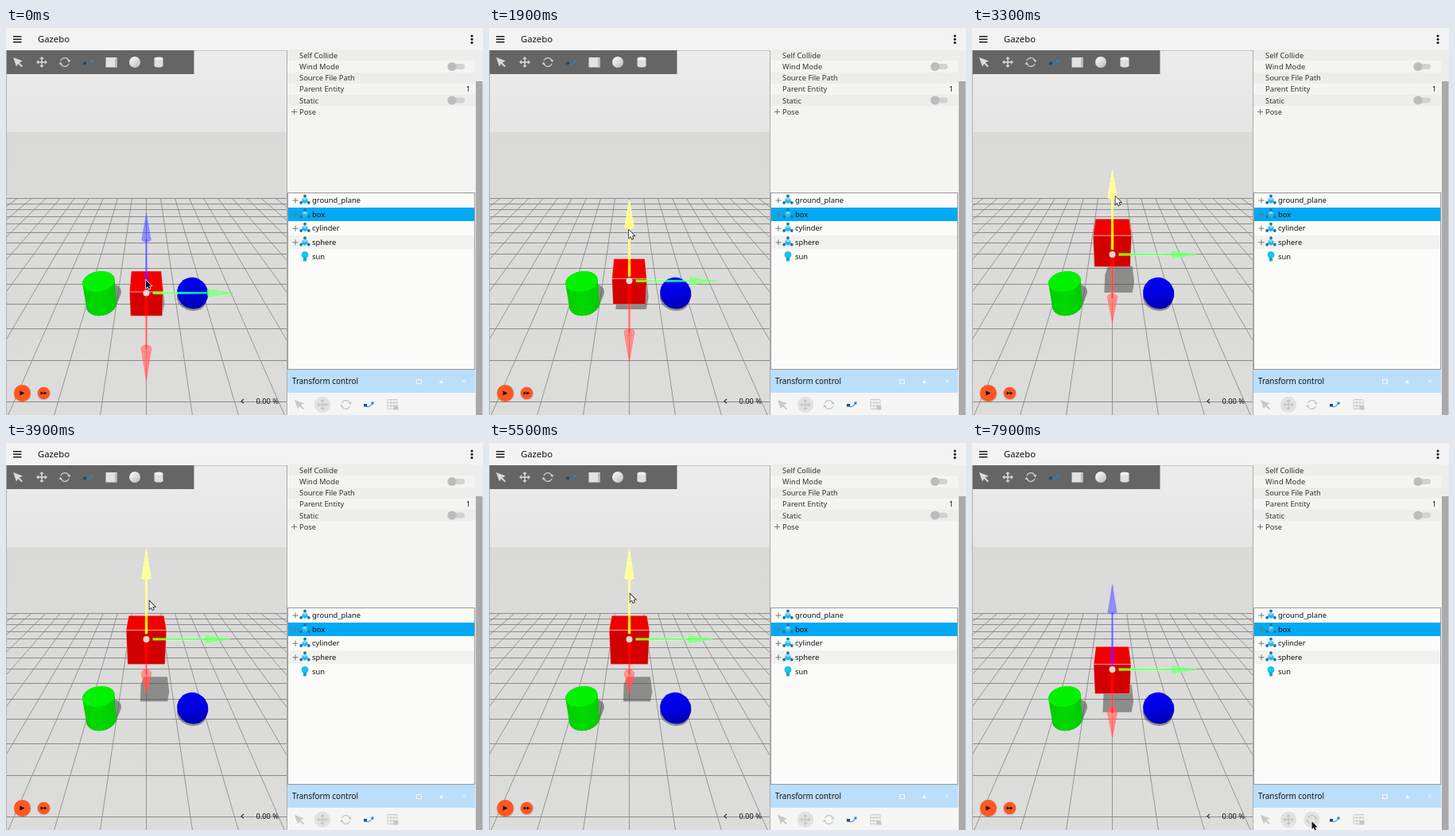
These frames come from a looping animation (600x487 px, 8000 ms). An HTML page with a canvas:

```html
<!DOCTYPE html>
<html lang="en">
<head>
<meta charset="utf-8">
<title>Transform control</title>
<style>
html, body { margin: 0; width: 100%; height: 100%; overflow: hidden; }
canvas { display: block; width: 600px; height: 487px; }
</style>
</head>
<body>
<canvas id="stage" width="600" height="487"></canvas>
<script>
const g = document.getElementById('stage').getContext('2d');
const LOOP = 8000, STEP = 100, TAU = Math.PI * 2;
const FONT = '"Noto Sans", "Open Sans", sans-serif';
const X = [1, 0, 0], Y = [0, 1, 0], Z = [0, 0, 1];

// Camera at (-6, 0, 6), pitched down by half a radian
const CX = 176.5, CY = 258, FOCAL = 305.7;
const COS = Math.cos(0.5), SIN = Math.sin(0.5);

function project([x, y, z]) {
  const dx = x + 6, dz = z - 6, depth = dx * COS - dz * SIN;
  return [CX - FOCAL * y / depth, CY - FOCAL * (dx * SIN + dz * COS) / depth];
}

// Motion
const ramp = (t, from, to) => Math.min(1, Math.max(0, (t - from) / (to - from)));
const easeOut = k => 1 - (1 - k) ** 3;
const easeIn = k => k ** 4;

const boxHeight = t => 0.5 + 0.5 * ramp(t, 1200, 1500) + ramp(t, 1900, 2600)
  + easeOut(ramp(t, 3200, 3800)) - easeIn(ramp(t, 5700, 6500));

// The handles keep a constant size on screen
const handleSize = h => 0.347 * Math.hypot(6, 6 - h);

// The pointer hangs below the arrow tip, then leaves for the panel
function pointerAt(t) {
  const h = boxHeight(t), tip = project([0, 0, h + handleSize(h)])[1];
  const grip = 84 - 16 * ramp(t, 0, 300) - 8 * ramp(t, 400, 800) - 22 * ramp(t, 1000, 1100)
    + 28 * ramp(t, 2700, 3900) - 9 * ramp(t, 4200, 5000);
  const swing = Math.sin(Math.PI * ramp(t, 4100, 5000)), leave = ramp(t, 6800, 7800);
  const x = 176 + 4.5 * ramp(t, 3100, 3300) - 3 * ramp(t, 4200, 5000) + 9 * swing;
  return [x + 250 * leave ** 1.3, tip + grip + 25 * swing + 241 * leave ** 0.55];
}

// Drawing helpers
function hull(points) {
  const p = [...points].sort((a, b) => a[0] - b[0] || a[1] - b[1]);
  const half = list => {
    const out = [];
    for (const q of list) {
      while (out.length > 1) {
        const [a, b] = out.slice(-2);
        if ((b[0] - a[0]) * (q[1] - a[1]) - (b[1] - a[1]) * (q[0] - a[0]) > 0) break;
        out.pop();
      }
      out.push(q);
    }
    return out.slice(0, -1);
  };
  return [...half(p), ...half(p.reverse())];
}

function path(points, close = true) {
  g.beginPath();
  points.forEach(([x, y]) => g.lineTo(x, y));
  if (close) g.closePath();
}
function poly(points, color) { path(points); g.fillStyle = color; g.fill(); }
function stroke(points, color, width = 1, close = false) {
  path(points, close);
  g.strokeStyle = color;
  g.lineWidth = width;
  g.stroke();
}
function rect(x, y, w, h, color) { g.fillStyle = color; g.fillRect(x, y, w, h); }
function frame(x, y, w, h, color) {
  g.strokeStyle = color;
  g.lineWidth = 1;
  g.strokeRect(x + 0.5, y + 0.5, w - 1, h - 1);
}
function disc(x, y, r, color, ry = r) {
  g.beginPath();
  g.ellipse(x, y, r, ry, 0, 0, TAU);
  g.fillStyle = color;
  g.fill();
}
function text(str, x, y, size = 9.35, color = '#111', align = 'left') {
  g.font = size + 'px ' + FONT;
  g.textAlign = align;
  g.fillStyle = color;
  g.fillText(str, x, y);
}
function gradient(x0, y0, x1, y1, ...colors) {
  const grad = g.createLinearGradient(x0, y0, x1, y1);
  colors.forEach((c, i) => grad.addColorStop(i / (colors.length - 1), c));
  return grad;
}
function at(x, y, draw) {
  g.save();
  g.translate(x, y);
  draw();
  g.restore();
}
function ring(c, u, v, r, n = 24) {
  return Array.from({ length: n }, (_, i) => {
    const a = i / n * TAU, p = Math.cos(a) * r, q = Math.sin(a) * r;
    return c.map((m, k) => m + u[k] * p + v[k] * q);
  });
}

// Scene
function ground() {
  const line = '#838383';
  rect(0, 28, 354, 103, gradient(0, 28, 0, 131, '#ececec', '#e5e5e5'));
  rect(0, 131, 354, 356, gradient(0, 131, 0, 487, '#dadad9', '#dcdcdb'));
  for (let i = -10; i <= 10; i++) {
    stroke([project([-4.4, i, 0]), project([10, i, 0])], line, 0.8);
    if (i < -4) continue;
    const ends = [-10, 10].map(y => project([i, y, 0]));
    stroke(ends.map(([x, y]) => [x, Math.floor(y) + 0.5]), line, 0.9);
  }
}

function shadow(solid) {
  const cast = solid.map(([x, y, z]) => project([x + 0.556 * z, y - 0.111 * z, 0]));
  poly(hull(cast), 'rgba(70,70,68,.52)');
}

function solids(h) {
  const square = z => ring([0, 0, z], X, Y, Math.SQRT1_2, 4)
    .map(([x, y]) => [(x + y) / Math.SQRT2, (y - x) / Math.SQRT2, z]);
  const top = square(h + 0.5), base = square(h - 0.5);
  const lid = ring([0, 1.5, 1], X, Y, 0.5), foot = ring([0, 1.5, 0], X, Y, 0.5);
  const ball = [];
  for (let a = 0; a < Math.PI; a += Math.PI / 10) {
    ball.push(...ring([0, -1.5, 0.5 + 0.5 * Math.cos(a)], X, Y, 0.5 * Math.sin(a)));
  }
  [[...lid, ...foot], ball, [...top, ...base]].forEach(shadow);

  poly(hull([...lid, ...foot].map(project)), gradient(97, 0, 139, 0, '#00cc00', '#00da00', '#00ca00'));
  poly(lid.map(project), '#00f200');
  poly(hull(ball.map(project)), gradient(232, 314, 238, 354, '#0000f2', '#0000e2', '#0000b0'));

  const lidFace = top.map(project);
  const near = pts => pts.filter(p => p[0] < 0).map(project);
  const front = [...near(top), ...near(base).reverse()];
  poly(lidFace, '#f00000');
  poly(front, '#d20000');
  for (const face of [lidFace, front]) stroke(face, 'rgba(255,215,215,.5)', 0.8, true);
}

// Translucent glowing paint: dims what is behind, then adds its own light
function glow(points, color) {
  poly(points, 'rgba(0,0,0,.32)');
  g.globalCompositeOperation = 'lighter';
  poly(points, color);
  g.globalCompositeOperation = 'source-over';
}

function arrow(h, dir, u, v, color, mesh) {
  const size = handleSize(h);
  const along = k => dir.map((d, i) => d * size * k + (i === 2 ? h : 0));
  const circle = (k, r) => ring(along(k), u, v, size * r, 16).map(project);
  const tip = project(along(1)), base = circle(0.712, 0.048);
  glow(hull([...circle(0.075, 0.016), ...circle(0.712, 0.01)]), color);
  glow(hull([...base, tip]), color);
  base.forEach((p, i) => { if (i % 2) stroke([p, tip], mesh, 0.5); });
  stroke(base, mesh, 0.5, true);
}

function gizmo(h, active) {
  arrow(h, [-1, 0, 0], Y, Z, '#f00000', 'rgba(255,80,80,.4)');
  arrow(h, [0, -1, 0], X, Z, '#00f000', 'rgba(110,245,110,.4)');
  if (active) arrow(h, Z, X, Y, '#f0f000', 'rgba(255,255,175,.4)');
  else arrow(h, Z, X, Y, '#0000f0', 'rgba(105,105,240,.4)');
  disc(...project([0, 0, h]), 4, '#e6d6d4');
}

// Icons
function pickIcon(x, y, color) {
  at(x, y, () => {
    poly([[-6, -6], [6, -1.5], [1.8, 0.5], [6, 5], [4.5, 6.3], [0.2, 2], [-2, 5.5]], color);
  });
}
function moveIcon(x, y, color) {
  at(x, y, () => {
    for (let i = 0; i < 4; i++) {
      rect(-0.8, -5, 1.6, 5.5, color);
      poly([[0, -7], [2.8, -3.9], [-2.8, -3.9]], color);
      g.rotate(TAU / 4);
    }
  });
}
function turnIcon(x, y, color) {
  at(x, y, () => {
    g.strokeStyle = color;
    g.lineWidth = 1.3;
    for (let i = 0; i < 2; i++) {
      g.beginPath();
      g.arc(0, 0, 5.4, 0.35, 2.75);
      g.stroke();
      poly([[-7.3, 2.8], [-3, 3], [-5.6, -0.6]], color);
      g.rotate(Math.PI);
    }
  });
}
function snapIcon(x, y) {
  stroke([[x - 4, y + 1], [x - 1, y + 3], [x + 3, y + 1], [x + 5, y - 2]], '#2a86c6', 1);
  rect(x - 6, y - 1, 4, 3.5, '#12507f');
  rect(x + 3.5, y - 3.5, 3, 3, '#2a86c6');
}
function gridIcon(x, y) {
  for (let d = -6; d <= 6; d += 4) {
    stroke([[x + d, y - 6], [x + d, y + 6]], '#c0c0c0', 0.8);
    stroke([[x - 6, y + d], [x + 6, y + d]], '#c0c0c0', 0.8);
  }
  rect(x + 1.5, y + 2, 6, 5, '#c6c6c6');
}
function modelIcon(x, y) {
  for (let i = 0; i < 3; i++) {
    at(x, y, () => {
      g.rotate(i * TAU / 3);
      rect(-0.5, -5, 1, 5, '#2277a8');
      disc(0, -5.6, 1.9, '#1c75a8');
    });
  }
  const hex = r => ring([x, y], [0, 1], [1, 0], r, 6);
  poly(hex(4), '#29b6e8');
  poly([[x, y], ...hex(4).slice(2, 5)], '#7cdcf7');
}
function plus(x, y) {
  rect(x - 3.5, y - 0.5, 7, 1, '#777');
  rect(x - 0.5, y - 3.5, 1, 7, '#777');
}
function toggle(y) {
  g.beginPath();
  g.roundRect(556, y - 3.5, 21, 7, 3.5);
  g.fillStyle = '#d2d2d2';
  g.fill();
  disc(561, y, 5.6, '#bcbcbc');
}

// Interface
function header() {
  rect(0, 0, 600, 28, '#f3f3f3');
  for (let i = 0; i < 3; i++) {
    rect(9, 10 + i * 3.5, 10.5, 1.4, '#111');
    disc(586, 10 + i * 4.3, 1.5, '#111');
  }
  text('Gazebo', 40, 18, 11.3);
}

function toolbar() {
  rect(0, 28, 236.5, 30, '#656565');
  pickIcon(15, 43, '#dadada');
  moveIcon(45, 43, '#d6d6d6');
  turnIcon(74, 43, '#d0d0d0');
  snapIcon(103, 43.5);
  rect(125.5, 37, 14, 12.5, '#e2e2e2');
  poly([[137, 39], [139.5, 37], [139.5, 48], [137, 49.5]], '#bcbcbc');
  disc(162, 43, 7, gradient(157, 37, 167, 50, '#fafafa', '#bdbdbd'));
  rect(186.5, 38.5, 11, 9, '#dedede');
  disc(192, 47.5, 5.5, '#dedede', 2);
  disc(192, 38.5, 5.5, '#f2f2f2', 2);
}

function playback() {
  const button = (x, r) => {
    disc(x, 460.2, r + 0.6, 'rgba(0,0,0,.1)');
    disc(x, 459.5, r, '#ff5722');
  };
  const triangle = (x, s) => {
    poly([[x, 459.5 - s], [x + 2 * s, 459.5], [x, 459.5 + s]], '#201008');
  };
  button(20.5, 10.5);
  triangle(17.5, 3);
  button(47.5, 7.8);
  triangle(43.5, 2.1);
  triangle(47.5, 2.1);
  stroke([[299, 467], [296, 469.7], [299, 472.4]], '#222', 1.1);
  text('0.00 %', 343, 473, 9.3, '#111', 'right');
}

function properties() {
  const rows = ['Self Collide', 'Wind Mode', 'Source File Path', 'Parent Entity', 'Static', 'Pose'];
  rect(354, 28, 236, 402, '#f4f4f2');
  rows.forEach((name, i) => {
    const y = 34.3 + i * 14.2;
    if (i % 2 === 0) rect(354, Math.round(y - 7), 236, 14, '#ededec');
    text(name, 369, y + 3.4, 9.35, '#333');
  });
  toggle(48.5);
  toggle(91);
  text('1', 584, 80.4, 9.35, '#111', 'right');
  plus(362.5, 105.5);
}

function tree() {
  const names = ['ground_plane', 'box', 'cylinder', 'sphere', 'sun'], pitch = 17.6;
  rect(354, 207, 236, 223, '#fbfbfa');
  names.forEach((name, i) => {
    const y = 217 + i * pitch, top = Math.round(208 + i * pitch);
    const fill = name === 'box' ? '#03a9f4' : i % 2 ? '#f1f1f0' : '#fbfbfa';
    rect(354, top, 236, Math.round(208 + (i + 1) * pitch) - top, fill);
    text(name, 385, y + 3.2);
    if (name === 'sun') {
      disc(376, y - 2, 4.4, '#19c3ee');
      rect(374, y + 1, 4, 5, '#19a5cc');
    } else {
      plus(364, y);
      modelIcon(376, y);
    }
  });
  frame(354, 207, 236, 223, '#999');
}

function transformPanel(hover) {
  const white = '#f3f9ff';
  rect(354, 430, 236, 29, '#bbdefb');
  text('Transform control', 360, 448.2, 9.85);
  frame(516, 442, 7, 6, white);
  poly([[547.5, 442.5], [550.2, 447], [544.8, 447]], white);
  for (const s of [-2.5, 2.5]) stroke([[576 - s, 442], [576 + s, 447]], white);
  rect(354, 459, 236, 28, '#f5f5f3');
  disc(398, 474, 10.2, '#e2e2e1');
  if (hover) disc(427.5, 474, 10.2, '#e2e2e1');
  pickIcon(369, 474, '#c8c8c8');
  moveIcon(398, 474, '#c6c6c6');
  turnIcon(427.5, 474, '#c4c4c4');
  snapIcon(456, 474);
  gridIcon(486, 473.5);
}

function scrollbar() {
  rect(590, 28, 10, 459, '#ededed');
  rect(591, 67, 8.5, 420, '#aaaaaa');
}

function pointer(x, y, hollow) {
  at(x, y, () => {
    const shape = [[0, 0], [0, 9.8], [2.3, 7.8], [3.8, 11.2], [5.4, 10.5], [4, 7.2], [7, 7]];
    stroke(shape, hollow ? '#111' : '#fff', 1.4, true);
    poly(shape, hollow ? '#f4f4f0' : '#111');
  });
}

function draw(t) {
  const dragging = t >= 1100 && t < 4200 || t >= 5300 && t < 6900;
  // The handles trail the box by one step while it rises
  const handle = boxHeight(t < 5000 ? t - STEP : t);
  g.save();
  g.beginPath();
  g.rect(0, 28, 354, 459);
  g.clip();
  ground();
  solids(boxHeight(t));
  gizmo(handle, dragging);
  rect(0, 28, 354, 1, '#c4c4c4');
  toolbar();
  playback();
  g.restore();
  header();
  properties();
  tree();
  transformPanel(t >= 7300);
  scrollbar();
  for (const x of [0, 353]) rect(x, 28, 1, 459, '#adadad');
  if (t < 7300 || t >= 7800) pointer(...pointerAt(t), t >= 1100 && t < 7300);
}

function tick() {
  draw(Math.floor(performance.now() % LOOP / STEP) * STEP);
  requestAnimationFrame(tick);
}
tick();
</script>
</body>
</html>
```
